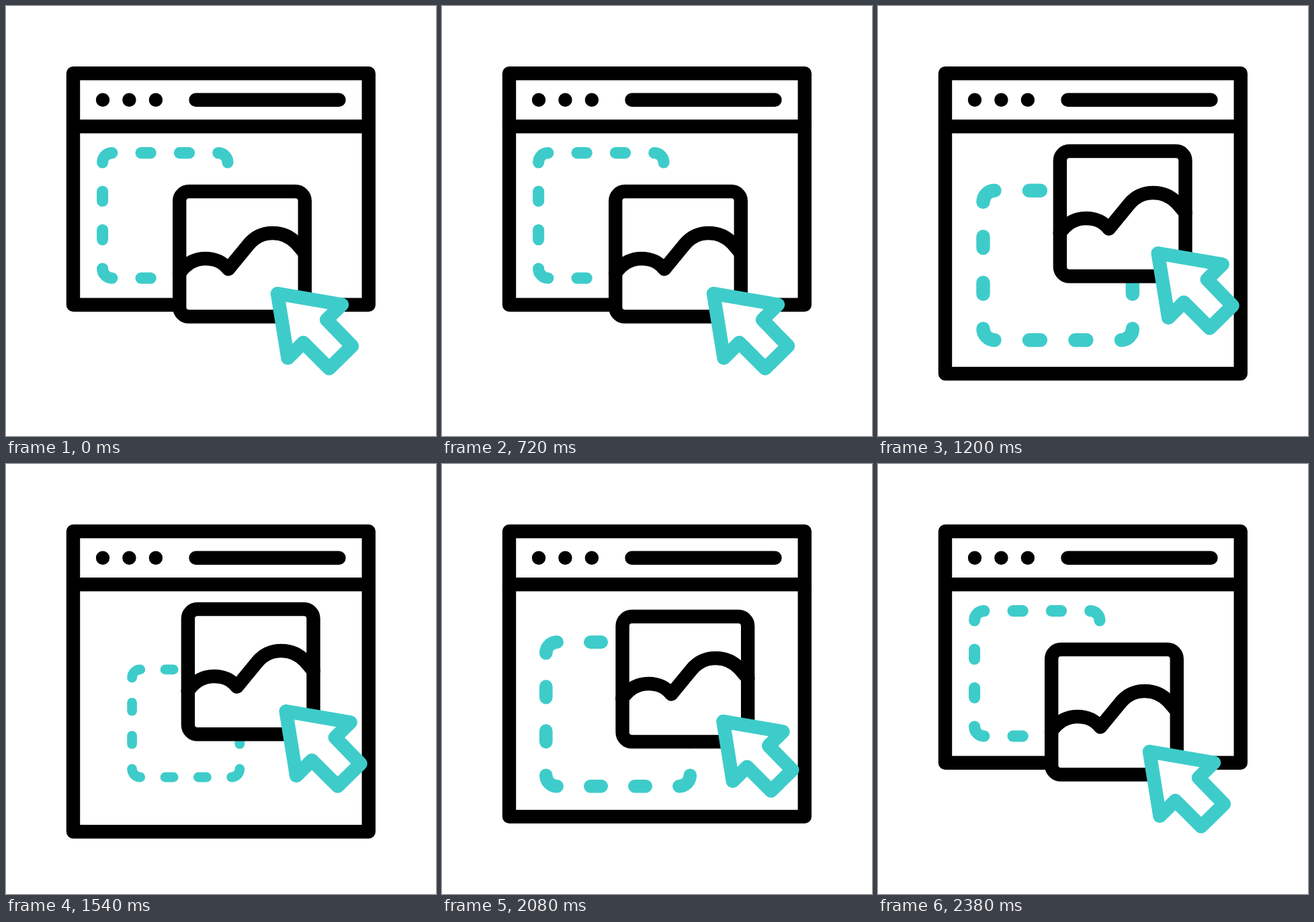
Write an HTML page without scripts that moves like this. It is 640 by 640 pixels and loops after 2.4 s.

```html
<!DOCTYPE html>
<html lang="en">
<head>
<meta charset="utf-8">
<title>Drag and drop</title>
<style>
  html, body { margin: 0; width: 100%; height: 100%; overflow: hidden; background: #fff; }
  svg { display: block; width: 100vw; height: 100vh; }

  svg * {
    animation: 2400ms cubic-bezier(.333, 0, .667, 1) infinite;
  }
  .ink, .accent {
    fill: none;
    stroke: #000;
    stroke-width: 20.4;
    stroke-linecap: round;
    stroke-linejoin: round;
  }
  .accent { stroke: #3eccca; }
  .accent path { vector-effect: non-scaling-stroke; }
  .paper { fill: #fff; }
  .dot { fill: #000; }

  #frame { animation-name: grow; }
  #slot { animation-name: slide; }
  #dashes { animation-name: pulse; }
  #drag { animation-name: drag; }
  #pointer { animation-name: click; transform-origin: 459.5px 484px; }

  @keyframes grow {
    0%, 30.42%, 98.33%, 100% { height: 344.5px; }
    47.08%, 81.67% { height: 447px; }
  }
  @keyframes slide {
    0%, 29.92%, 98.33%, 100% { translate: 236.8px 311.8px; }
    45.92%, 82.33% { translate: 267.7px 386px; }
  }
  @keyframes pulse {
    0%, 30.42%, 98.33%, 100% { scale: .838; }
    47.08%, 50%, 79.17%, 81.67% { scale: 1; }
    64.58% { scale: .72; }
  }
  @keyframes drag {
    0%, 29.92%, 98.33%, 100% { translate: 0 0; }
    45.92%, 82.33% { translate: 12.7px -60px; }
  }
  @keyframes click {
    0%, 8.33%, 27.5%, 82.92%, 98.33%, 100% { scale: 1; }
    17.92% { scale: .8; }
    90.63% { scale: .85; }
  }
</style>
</head>
<body>
<svg viewBox="0 0 640 640">
  <defs>
    <path id="side" d="M-111.2-94.2a17 17 0 0 1 17-17M-42.7-111.2h17M25.7-111.2h17"/>
  </defs>

  <g class="ink">
    <rect id="frame" x="100" y="100.3" width="439.8" height="344.5"/>
    <path d="M100 179.3H540M282.5 139.8H495.5"/>
  </g>
  <g class="dot">
    <circle cx="144" cy="139.8" r="10.2"/>
    <circle cx="183.4" cy="139.8" r="10.2"/>
    <circle cx="222.9" cy="139.8" r="10.2"/>
  </g>

  <g id="slot">
    <g id="dashes" class="accent">
      <use href="#side"/>
      <use href="#side" transform="rotate(90)"/>
      <use href="#side" transform="rotate(180)"/>
      <use href="#side" transform="rotate(270)"/>
    </g>
  </g>

  <g id="drag">
    <g class="ink">
      <rect class="paper" x="258.2" y="276" width="186.6" height="186.3" rx="14"/>
      <path d="M258 398C268 383 282 376 297 376S322 381 331 391.5L361 355C370 344 383 338 397 338S424 344 433 354L445 368"/>
    </g>
    <g id="pointer" class="accent">
      <path class="paper" d="M404 428L500 444.5 477 467 515 506 481 539.5 442.5 501 419.5 524Z"/>
    </g>
  </g>
</svg>
</body>
</html>
```
